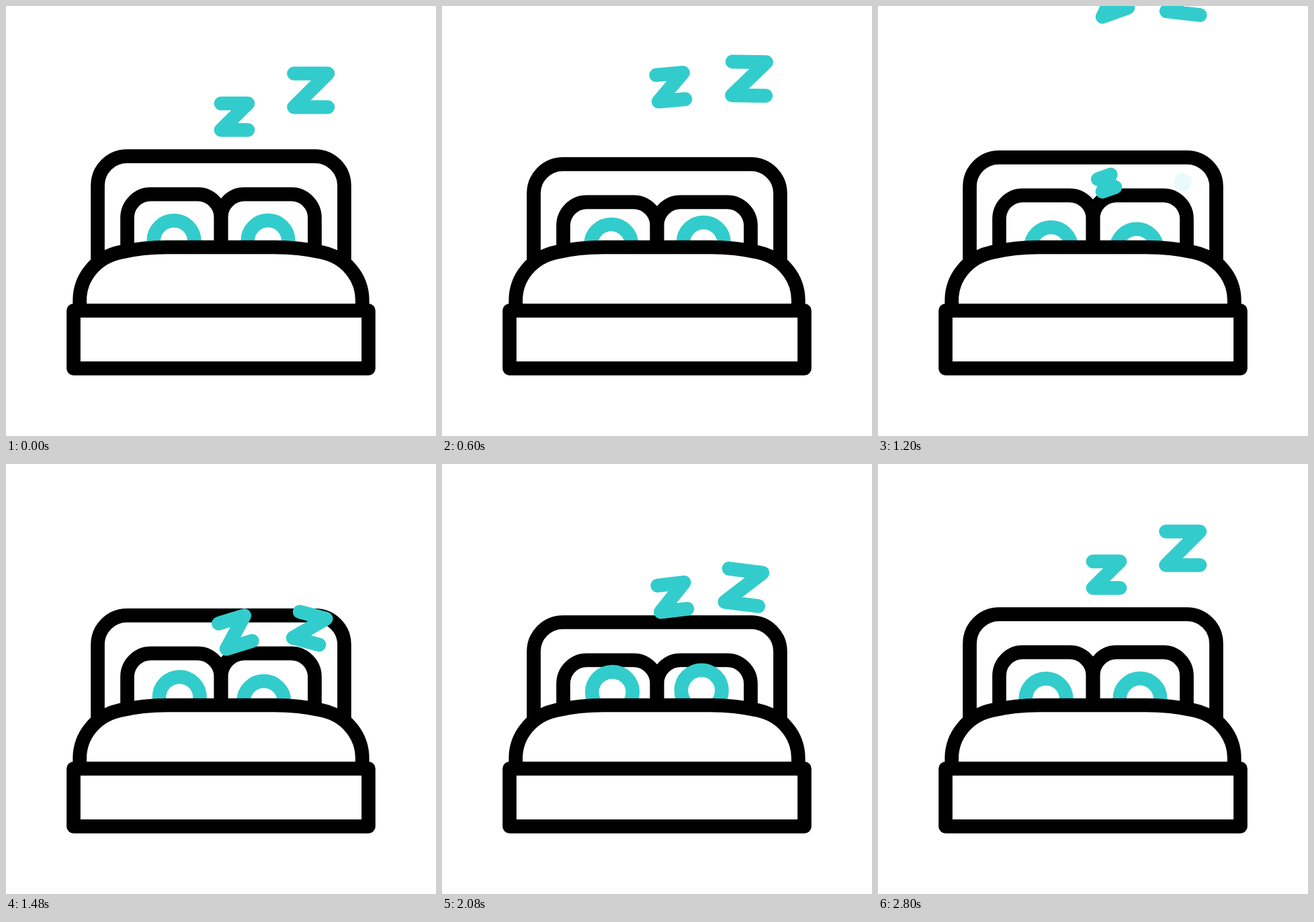
Animation, 640 px wide and 640 px high, one loop 3 s. Source, as an HTML page:

```html
<!DOCTYPE html>
<html lang="en">
<head>
<meta charset="utf-8">
<title>Sleeping bed</title>
<style>
  html, body { margin: 0; width: 100%; height: 100%; overflow: hidden; background: #fff; }
  svg { display: block; width: 100vw; height: 100vh; }
  path, circle, rect { fill: none; stroke: #000; stroke-width: 20.7; stroke-linejoin: round; }
  .teal { stroke: #3cc; stroke-linecap: round; }
  .solid { fill: #fff; }
</style>
</head>
<body>
<svg viewBox="0 0 640 640">
  <g id="back">
    <path d="M136.5 382V267.2A43.5 43.5 0 0 1 180 223.7H460A43.5 43.5 0 0 1 503.5 267.2V382"/>
    <path d="M180.5 362V315.2A35 35 0 0 1 215.5 280.2H285A35 35 0 0 1 320 315.2V362"/>
    <path d="M320 362V315.2A35 35 0 0 1 355 280.2H424.5A35 35 0 0 1 459.5 315.2V362"/>
  </g>
  <circle id="headL" class="teal" r="30.3"/>
  <circle id="headR" class="teal" r="30.3"/>
  <path class="solid" d="M109.7 450V438C109.7 404 134 374 170 366.5C195 361 220 359 240 359H400C420 359 445 361 470 366.5C506 374 530.3 404 530.3 438V450"/>
  <rect class="solid" x="100.5" y="453.4" width="439" height="86"/>
  <path id="smallOut" class="teal"/>
  <path id="bigOut" class="teal"/>
  <path id="smallIn" class="teal"/>
  <path id="bigIn" class="teal"/>
</svg>
<script>
const LOOP = 3000, LAST = 2800, STEP = 40;
const $ = id => document.getElementById(id);
const progress = (t, start, span) => Math.max(0, Math.min(1, (t - start) / span));
const smooth = u => u * u * (3 - 2 * u);
const mix = (a, b, k) => a + (b - a) * k;

// The bed back sinks and rises twice.
const SINK = 12.5, TURNS = [0, 710, 1340, 1960, LAST];

function sink(t) {
  const i = Math.max(0, TURNS.findIndex(k => t <= k) - 1);
  const s = smooth(progress(t, TURNS[i], TURNS[i + 1] - TURNS[i]));
  return SINK * (i % 2 ? 1 - s : s);
}

// Each head follows one eased loop: down, inwards, up and back.
const heads = [
  { el: $('headL'), cx: 250, cy: 349.7, reach: 8.3, start: 200, span: 2460 },
  { el: $('headR'), cx: 390, cy: 349.5, reach: -6.3, start: 320, span: 2480 }
];

function drawHead(h, t) {
  const phase = 2 * Math.PI * smooth(progress(t, h.start, h.span));
  h.el.setAttribute('cx', h.cx + h.reach * Math.sin(phase / 2));
  h.el.setAttribute('cy', h.cy + 13 * Math.sin(phase));
}

const SMALL = { cx: 340, cy: 164.75, w: 20, h: 19.75 };
const BIG = { cx: 453.75, cy: 125.5, w: 25.2, h: 25 };
const LEAVE = { from: 0, to: -218, span: 1420, turnFrom: 0, soft: 1 };

const zeds = [
  { el: $('smallOut'), ...SMALL, ...LEAVE, start: 190, turnTo: -24.7, sway: 0, drift: 10 },
  { el: $('bigOut'), ...BIG, ...LEAVE, start: 355, turnTo: 10.5, sway: 14, drift: -22.5 },
  { el: $('smallIn'), ...SMALL, born: 1000, start: 1098, span: 1604, soft: 1,
    from: 100, to: 0, turnFrom: -20, turnTo: 0, sway: 3.3, drift: 0 },
  { el: $('bigIn'), ...BIG, born: 1160, start: 1160, span: 1640, soft: 0.6,
    from: 138, to: 0, turnFrom: 17, turnTo: 0, sway: -5, drift: 0 }
];

function drawZed(z, t) {
  const u = progress(t, z.start, z.span), p = mix(u, smooth(u), z.soft);
  const x = z.cx + z.sway * Math.sin(Math.PI * p) + z.drift * p * p;
  const y = z.cy + mix(z.from, z.to, p);
  const grow = z.born ? progress(t, z.born, 400) : 1;
  const w = z.w * grow, h = z.h * grow;
  z.el.setAttribute('d', `M${-w} ${-h}H${w}L${-w} ${h}H${w}`);
  z.el.setAttribute('transform',
    `translate(${x} ${y}) rotate(${mix(z.turnFrom, z.turnTo, p)})`);
  z.el.setAttribute('opacity', smooth(Math.min(1, grow * 2)));
}

function draw(time) {
  const t = Math.min(LAST, Math.floor((time % LOOP) / STEP) * STEP);
  $('back').setAttribute('transform', `translate(0 ${sink(t)})`);
  heads.forEach(h => drawHead(h, t));
  zeds.forEach(z => drawZed(z, t));
}

const begin = performance.now();
function tick() {
  draw(performance.now() - begin);
  requestAnimationFrame(tick);
}
tick();
</script>
</body>
</html>
```
